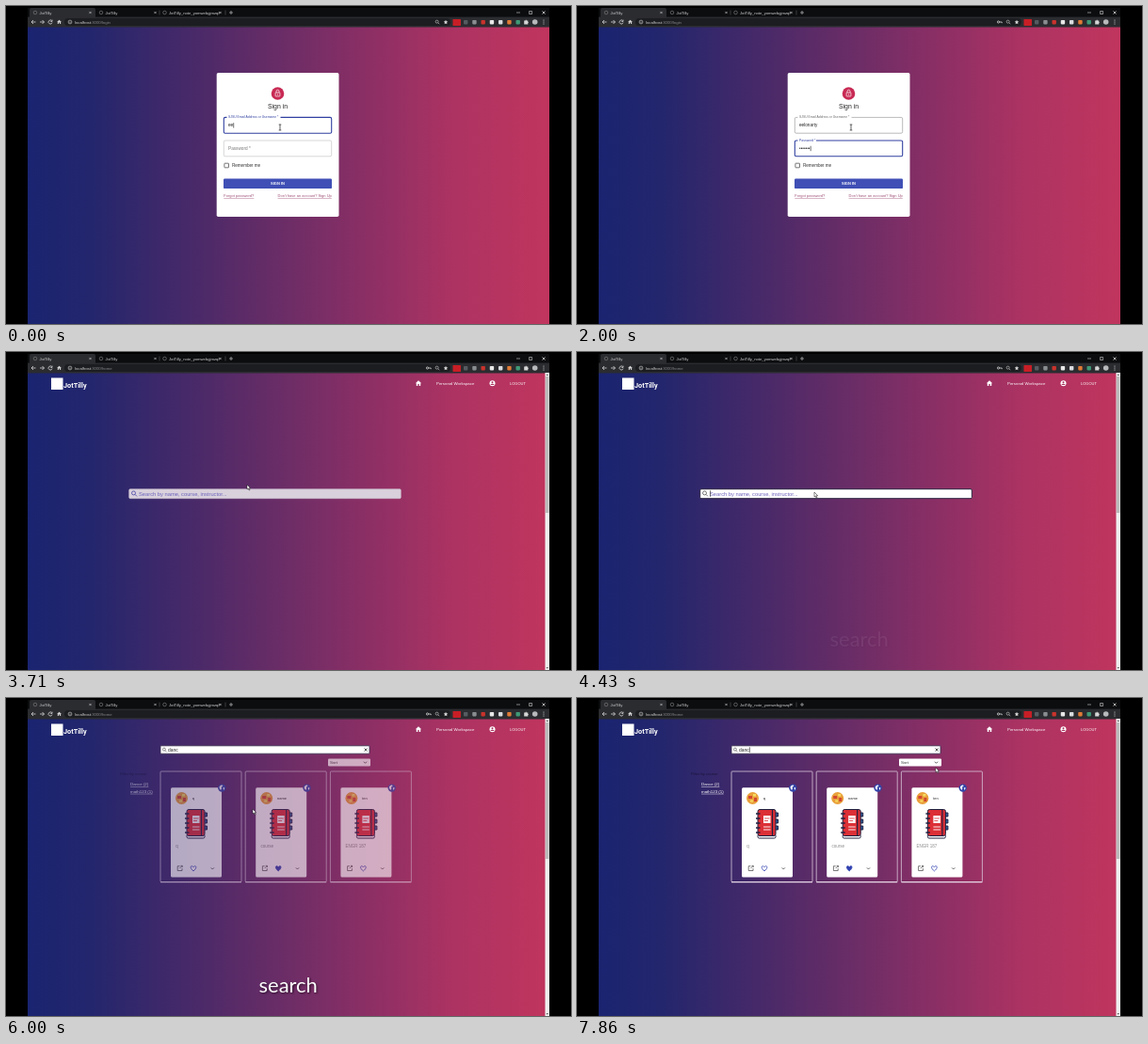
These frames come from a looping animation (600 px wide and 338 px high, 8000 ms). An HTML page:

```html
<!DOCTYPE html>
<html lang="en">
<head>
<meta charset="utf-8">
<title>Sign in and search</title>
<style>
  html, body { margin: 0; width: 100%; height: 100%; overflow: hidden; background: #000; }
  svg { display: block; width: 600px; height: 338px; }
  text { font-family: "Liberation Sans", Arial, sans-serif; white-space: pre; }
  .line { fill: none; stroke: currentColor; stroke-width: .8; }
  .white { fill: #fff; color: #fff; }
  .caption { font: 22px Lato, "Open Sans", sans-serif; fill: #fff; filter: drop-shadow(1px 1px 1px #0009); }
</style>
</head>
<body>
<svg viewBox="0 0 600 338">
  <defs>
    <linearGradient id="sky">
      <stop offset="0" stop-color="#1a2470"/>
      <stop offset=".12" stop-color="#23266d"/>
      <stop offset=".35" stop-color="#4f2a68"/>
      <stop offset=".5" stop-color="#6d2d66"/>
      <stop offset=".66" stop-color="#8d2f65"/>
      <stop offset=".82" stop-color="#ad3362"/>
      <stop offset="1" stop-color="#c0355e"/>
    </linearGradient>
    <g id="cross"><path class="line" d="M-1.5-1.5l3 3m0-3l-3 3"/></g>
    <path id="chevron" class="line" d="M-1.6-.8L0 .8 1.6-.8"/>
    <path id="heart" d="M0 2.7C-5-1-2.2-4.4 0-1.5 2.2-4.4 5-1 0 2.7z"/>
    <g id="lens"><circle class="line" cx="-.5" cy="-.5" r="2"/><path class="line" d="M1 1l2 2"/></g>
    <g id="house"><path d="M0-3L3.2 0H2.2V2.8H.7V.7H-.7V2.8H-2.2V0H-3.2z"/></g>
    <g id="book">
      <path d="M20 4h3.5v4H20zm0 7h3.5v4H20zm0 7h3.5v4H20z" fill="#2c5f9e" stroke="#1e2140" stroke-width="1"/>
      <rect x="2" y="27" width="19" height="4" rx="1.5" fill="#fff" stroke="#1e2140"/>
      <rect x="2" y=".5" width="19" height="28" rx="2" fill="#dc2f36" stroke="#1e2140"/>
      <path d="M17.5 1v27" stroke="#1e2140" stroke-width="1.2"/>
      <rect x="8" y="7" width="7.5" height="8" fill="#fff"/>
      <path d="M9 10h5.5m-5.5 2.5h4" stroke="#dc2f36" stroke-width=".8"/>
      <path d="M8 19h7.5m-7.5 3h7.5" stroke="#fff" stroke-width=".9"/>
      <path d="M0 5h4.5M0 10h4.5M0 15h4.5M0 20h4.5M0 25h4.5" stroke="#1e2140" stroke-width="1.4"/>
    </g>
  </defs>

  <rect x="23" y="22" width="554" height="316" fill="url(#sky)"/>
  <g id="chrome"></g>

  <g id="login">
    <rect x="223.7" y="71" width="129.8" height="153" rx="1.8" fill="#fff"/>
    <circle cx="288.5" cy="93" r="6.8" fill="#c82a54"/>
    <g class="white"><rect class="line" x="286.1" y="92" width="4.8" height="4" rx=".5" style="stroke-width:.7"/>
      <path class="line" d="M287 92v-1.3a1.5 1.5 0 0 1 3 0v1.3" style="stroke-width:.7"/><circle cx="288.5" cy="94" r=".6"/></g>
    <text x="288.5" y="108.6" font-size="6.9" text-anchor="middle" fill="#222">Sign in</text>
    <rect id="userBox" x="231.3" y="118.4" width="114.4" height="16.8" rx="1.5" fill="none"/>
    <rect x="234.5" y="117" width="57" height="3" fill="#fff"/>
    <text id="userLabel" x="236" y="119.3" font-size="3.35">SJSU Email Address or Username *</text>
    <text id="user" x="236" y="128.4" font-size="4.7" fill="#222"></text>
    <rect id="passBox" x="231.3" y="143" width="114.4" height="16.8" rx="1.5" fill="none"/>
    <rect id="notch" x="234.5" y="142" width="19.5" height="3" fill="#fff"/>
    <text id="passLabel" x="236">Password *</text>
    <text id="pass" x="236" y="153" font-size="4.7" fill="#222"></text>
    <rect x="231.9" y="167.2" width="4.6" height="4.6" rx=".5" fill="none" stroke="#555" stroke-width=".8"/>
    <text x="240" y="171.4" font-size="4.55" fill="#333">Remember me</text>
    <rect x="231" y="183.5" width="115" height="10.6" rx="1.2" fill="#3f4fb5"/>
    <text x="288.5" y="190.2" font-size="4" text-anchor="middle" fill="#fff" font-weight="bold">SIGN IN</text>
    <g font-size="4" fill="#9c4a72" text-decoration="underline">
      <text x="231.3" y="203.4">Forgot password?</text>
      <text x="345.8" y="203.4" text-anchor="end">Don't have an account? Sign Up</text>
    </g>
  </g>

  <g id="home">
    <rect x="572.5" y="22" width="4.5" height="316" fill="#f0f0f0"/>
    <rect x="573" y="26" width="3.5" height="145" fill="#bcbcbc"/>
    <path d="M573.5 25l1.3-1.7 1.3 1.7zm0 310l1.3 1.7 1.3-1.7z" fill="#666"/>
    <g class="white" font-size="4.4">
      <rect x="48" y="27.5" width="12.5" height="12.5"/>
      <text x="61" y="37.5" style="font:bold 7.3px Roboto,sans-serif">JotTilly</text>
      <use href="#house" x="438" y="33.3"/>
      <text x="457" y="34.6">Personal Workspace</text>
      <circle cx="516.5" cy="33.3" r="3"/>
      <g fill="#a8325f"><circle cx="516.5" cy="32.2" r="1"/><path d="M514.5 35a2 1.3 0 0 1 4 0z"/></g>
      <text x="535" y="34.6" font-size="4">LOGOUT</text>
    </g>
    <g id="bigSearch">
      <rect id="bigBox" x="130.7" y="145.7" width="288.6" height="10" rx="1.2"/>
      <use id="bigLens" href="#lens" x="136" y="150.4"/>
      <text id="hint" x="141" y="152.7" font-size="5.75" fill="#6b63bb">Search by name, course, instructor...</text>
      <text id="bigText" x="141" y="152.4" font-size="5.7" fill="#222"></text>
      <use id="bigClear" href="#cross" transform="translate(413.5 150.4) scale(1.5)" color="#333"/>
    </g>
    <g id="smallSearch">
      <rect x="164" y="50.8" width="222" height="8.4" rx=".8" fill="#fff" stroke="#332b4a" stroke-width=".8"/>
      <use href="#lens" transform="translate(168.3 55) scale(.75)" color="#444"/>
      <text id="smallText" x="172" y="56.7" font-size="4.9" fill="#222"></text>
      <use href="#cross" x="382" y="55" color="#333"/>
    </g>
    <g id="results">
      <rect x="342" y="64.5" width="45" height="8" rx="1" fill="#fff"/>
      <text x="344" y="70.1" font-size="4.4" fill="#333">Sort</text>
      <use href="#chevron" x="381.5" y="68.5" color="#333"/>
      <text x="121" y="81.6" font-size="4.2" fill="#1b1638">Filter by course</text>
      <g class="white" font-size="4.4" text-decoration="underline">
        <text x="132" y="93.4">Dance (2)</text><text x="132" y="100.8">math123 (1)</text>
      </g>
      <g id="cards"></g>
    </g>
  </g>

  <rect id="caret" width=".6" fill="#111"/>
  <text id="caption" class="caption" x="299.7" y="313" text-anchor="middle">search</text>
  <path id="beam" d="M-1.3-3h2.6M0-3v6m-1.3 0h2.6" fill="none" stroke="#222" stroke-width=".7"/>
  <path id="arrow" d="M0 0v5l1.2-1 .9 2 .9-.4-.9-1.9h1.6z" fill="#fff" stroke="#111" stroke-width=".5"/>
</svg>
<script>
const $ = id => document.getElementById(id);
const set = (id, attrs) => { for (const k in attrs) $(id).setAttribute(k, attrs[k]); };
const show = (id, on) => { $(id).style.display = on ? '' : 'none'; };
const ramp = (t, a, b) => Math.min(1, Math.max(0, (t - a) / (b - a)));
const LOOP = 8000, STEP = LOOP / 56;
const LOGGED_IN = 2500, FOCUS_PASS = 1140, FOCUS_SEARCH = 4280, RESULTS = 5700;

// Browser window
const tab = (x, label, end) => `<circle cx="${x}" cy="7" r="1.8" fill="none" stroke="#777" stroke-width=".7"/>
  <text x="${x + 4.5}" y="8.5">${label}</text><use href="#cross" transform="translate(${end} 7) scale(.75)"/>`;
const extensions = ['#555b60', '#8a8d90', '#c8332c', '#e8e8e8', '#d9dcdf', '#e07b35', '#3f9a76'];
$('chrome').innerHTML = `
  <rect x="23" y="2" width="554" height="10" fill="#0c0d0f"/>
  <path d="M25 12V4q0-2 2-2h66q2 0 2 2v8z" fill="#2b2c30"/>
  <rect x="23" y="11.6" width="554" height="10.9" fill="#2b2c30"/>
  <rect x="62" y="13" width="410" height="8" rx="4" fill="#1c1d20"/>
  <g font-size="4.2" fill="#d5d5d5" color="#d5d5d5">
    ${tab(31, 'JotTilly', 89.5)}${tab(101, 'JotTilly', 158.5)}${tab(168.5, 'JotTilly_note_yomwebgjmzqf', 227.5)}
    <path class="line" style="stroke-width:.6" d="M163 4.5v5M233 4.5v5" opacity=".4"/>
    <path class="line" d="M237 7h4m-2-2v4M542 7h4M555.6 5.5h3v3h-3z" style="stroke-width:.6"/>
    <use href="#cross" x="571" y="7"/>
    <path class="line" d="M31.5 17h-4.5m2-2l-2 2 2 2M36 17h4.5m-2-2l2 2-2 2M48.8 16a2 2 0 1 0 .2 1.6m0-3v1.8h-1.8"/>
    <use href="#house" transform="translate(56.5 17) scale(.75)"/>
    <circle class="line" cx="68" cy="17" r="1.9" style="stroke-width:.6"/><path class="line" d="M68 16.5v1.6" style="stroke-width:.6"/>
    <text x="73" y="18.6" font-size="4.3">localhost:<tspan fill="#85888c" id="path"></tspan></text>
    <g id="key"><circle class="line" cx="447.5" cy="17" r="1.1"/><path class="line" d="M448.6 17h2.6v1.2"/></g>
    <use href="#lens" transform="translate(458 17) scale(.75)"/>
    <path d="M467 14.8l.7 1.5 1.6.2-1.2 1.1.3 1.6-1.4-.8-1.4.8.3-1.6-1.2-1.1 1.6-.2z"/>
    <rect x="474.5" y="14" width="8.5" height="7" rx=".5" fill="#c81e26"/>
    ${extensions.map((c, i) => `<rect x="${486 + i * 9.25}" y="15" width="4.4" height="4.4" rx=".8" fill="${c}"/>`).join('')}
    <path d="M550.2 15.5h1.4q.5-1.8 1.2 0h1.5v1.4q1.6.5 0 1.2v1.5h-4.1z"/>
    <circle cx="561.7" cy="17" r="2.8" fill="#b8b9bb"/>
    <g><circle cx="571" cy="15" r=".55"/><circle cx="571" cy="17" r=".55"/><circle cx="571" cy="19" r=".55"/></g>
  </g>`;

// Result cards
const card = ([name, course, liked], i) => `<g transform="translate(${i * 90.2} 0)">
  <rect x="164" y="78" width="86" height="117.5" rx=".8" fill="none" stroke="#d9c6da" stroke-width=".8"/>
  <path d="M164 195.6h86" stroke="#e6d8e6" stroke-width="1.1"/>
  <rect x="175" y="95.2" width="54" height="95.3" rx="1.5" fill="#fff"/>
  <circle cx="186.5" cy="106.5" r="6.5" fill="#e9a03a"/>
  <path d="M182 104h4v3h-4zm6 2h3v4h-3z" fill="#d3472f"/><path d="M187 102h3v2.5h-3zm-3 6.5h3v2h-3z" fill="#f6dc62"/>
  <text x="197.8" y="108" font-size="4" fill="#222">${name}</text>
  <circle cx="229.3" cy="95.6" r="4.2" fill="#3344a8"/>
  <path d="M226.6 94.2q1.3-2 3-1.8l.6 1.4-1.6.8.4 1.5-1 1.9q-1.8-1.2-1.4-3.8zm3.8 1.4l1.6-.6q.4 1.6-.8 2.9z" fill="#fff"/>
  <use href="#book" x="190" y="118"/>
  <text x="180.2" y="158.8" font-size="4.5" fill="#8a8a8a">${course}</text>
  <path class="line" color="#444" d="M184.5 178.7h-2.3v4.8h4.8v-2.4m-2.6 0l2.8-2.8m-1.7 0h1.7v1.7" style="stroke-width:.7"/>
  <use href="#heart" x="199" y="181.2" fill="${liked ? '#3040b0' : 'none'}" stroke="#3040b0" stroke-width=".8"/>
  <use href="#chevron" x="219.3" y="181.2" color="#444"/></g>`;
$('cards').innerHTML = [['q', 'q'], ['name', 'course', true], ['ten', 'ENGR 187']].map(card).join('');

// Keystroke times
const userKeys = [0, 0, 140, 290, 430, 570, 710, 860, 1000];
const passKeys = [1290, 1430, 1500, 1570, 1710, 1790, 1860];
const searchKeys = [4860, 5000, 5140, 5430];
const typed = (word, keys, t) => word.slice(0, keys.filter(k => k <= t + 5).length);

const pointer = [[0, 291, 129], [2430, 291, 129], [3200, 256, 141], [3710, 256, 141], [4200, 252, 149],
  [5570, 252, 149], [6000, 262, 118], [6430, 300, 80], [6860, 323, 63], [7300, 350, 66], [7860, 381, 74], [8000, 381, 74]];
function pointerAt(t) {
  const i = pointer.findIndex(p => p[0] > t), a = pointer[i - 1], b = pointer[i];
  const k = ramp(t, a[0], b[0]);
  return [1, 2].map(n => a[n] + (b[n] - a[n]) * k);
}

function placeCaret(id, keys, t) {
  const el = $(id), size = +el.getAttribute('font-size');
  const last = keys.filter(k => k <= t + 5).pop() ?? keys[0] - 500;
  show('caret', Math.floor((t - last + 5) / 500) % 2 === 0);
  set('caret', { x: +el.getAttribute('x') + el.getComputedTextLength() + .3,
    y: el.getAttribute('y') - size * .9, height: size * 1.15 });
}

function drawLogin(t) {
  const onPass = t >= FOCUS_PASS, k = ramp(t, FOCUS_PASS - 60, FOCUS_PASS + 140);
  const border = on => ({ stroke: on ? '#3040a0' : '#8c8c8c', 'stroke-width': on ? 1.1 : .6 });
  set('userBox', border(!onPass));
  set('userLabel', { fill: onPass ? '#666' : '#3040a0' });
  set('passBox', { ...border(onPass), 'stroke-opacity': onPass ? 1 : .6 });
  set('passLabel', { y: 153.2 - 9.2 * k, 'font-size': 4.7 - 1.25 * k, fill: onPass ? '#3040a0' : '#777' });
  show('notch', onPass);
  $('user').textContent = typed('eelonarty', userKeys, t);
  $('pass').textContent = typed('•••••••', passKeys, t);
  if (onPass) placeCaret('pass', passKeys, t);
  else placeCaret('user', userKeys, t);
}

function drawHome(t) {
  const focused = t >= FOCUS_SEARCH, found = t >= RESULTS, word = typed('danc', searchKeys, t);
  show('bigSearch', !found);
  show('smallSearch', found);
  show('results', found);
  set('bigBox', { fill: focused ? '#fff' : '#d9d1dc', stroke: focused ? '#2a2440' : '#c9bfcf', 'stroke-width': focused ? 1 : .6 });
  set('bigLens', { color: focused ? '#555' : '#4a44a8' });
  show('hint', !word);
  show('bigClear', word);
  $('bigText').textContent = $('smallText').textContent = word;
  set('results', { opacity: .15 + .85 * ramp(t, RESULTS, 6260) });
  if (focused) placeCaret(found ? 'smallText' : 'bigText', searchKeys, t);
  else show('caret', false);
}

function draw(now) {
  const t = Math.floor((now % LOOP + 3) / STEP) * STEP % LOOP;
  const home = t >= LOGGED_IN;
  show('login', !home);
  show('home', home);
  show('key', t >= FOCUS_PASS);
  $('path').textContent = home ? '3000/home' : '3000/login';
  (home ? drawHome : drawLogin)(t);
  set('caption', { opacity: ramp(t, 4400, 4850) * (1 - ramp(t, 7420, 7800)) });
  const at = { transform: `translate(${pointerAt(t)})` };
  set('beam', at);
  set('arrow', at);
  show('beam', !home);
  show('arrow', home);
}

let start;
function tick(now) {
  start ??= now;
  draw(now - start);
  requestAnimationFrame(tick);
}
draw(0);
requestAnimationFrame(tick);
</script>
</body>
</html>
```
